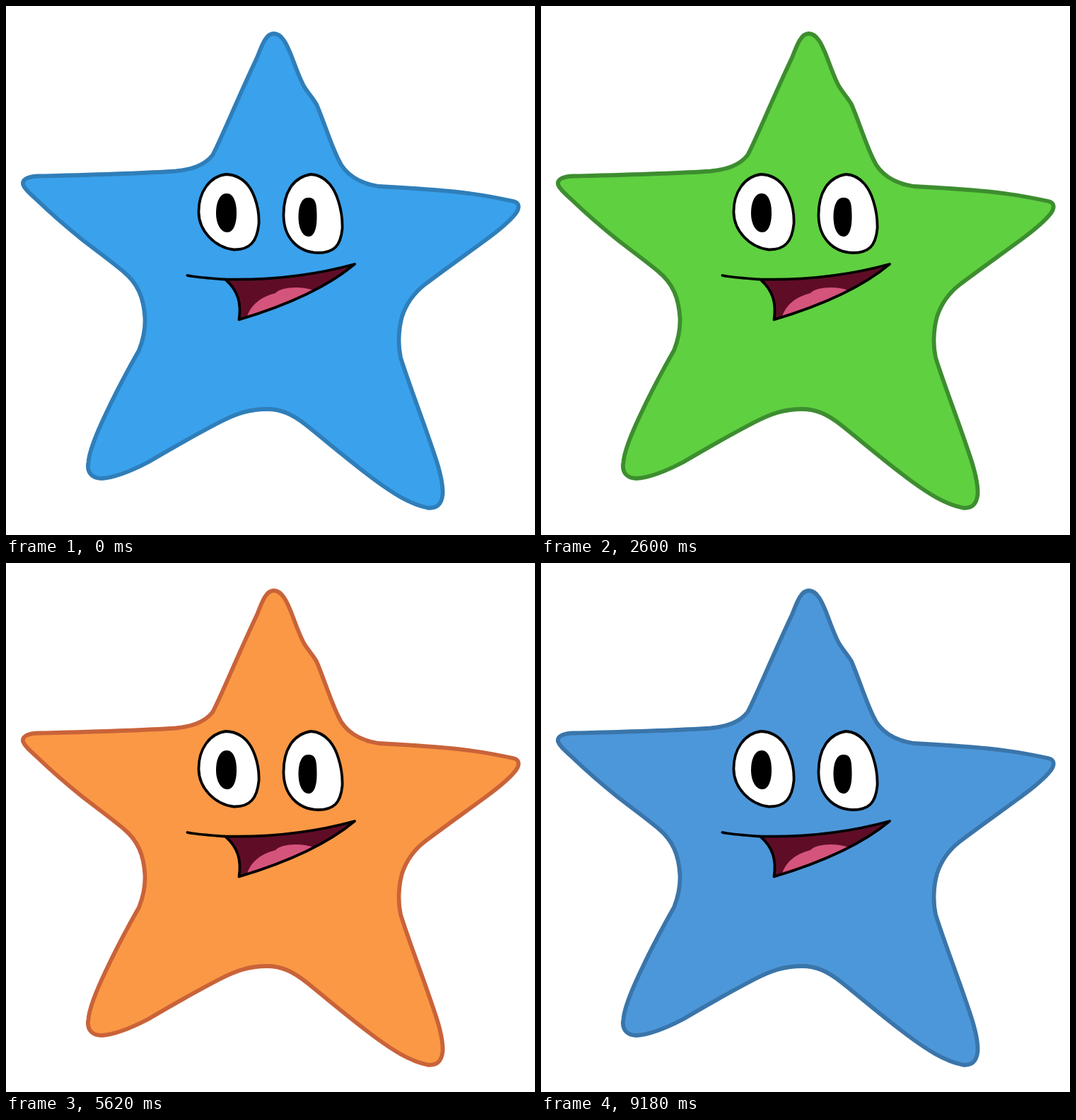
Recreate the animation shown at these times as an HTML page. Size 748x748 px, loop 9240 ms.

```html
<!DOCTYPE html>
<html lang="en">
<head>
<meta charset="utf-8">
<title>Color-changing star</title>
<style>
  html, body { margin: 0; width: 100%; height: 100%; overflow: hidden; background: #fff; }
  svg { display: block; width: 100%; height: 100%; }
  .ink { stroke: #000; stroke-width: 3.8; stroke-linecap: round; stroke-linejoin: round; }
</style>
</head>
<body>
<svg viewBox="0 0 748 748">
  <path id="star" stroke-width="5.8" stroke-linejoin="round" d="M378.500 39
    C391 39 398 57 403 69 C408 82 414 100 421 113 C427 123 434 130 439 139
    C449 162 459 195 470 217 C479 238 500 251 527 255
    C585 258 630 261 662 266 C684 269 703 273 717 276 C727 278 726 286 721 293
    C712 305 697 317 678 331 C648 353 620 373 592 394 C574 408 565 424 560 439
    C555 457 554 480 558 497 C570 536 590 586 607 638 C614 659 618 676 617.500 690
    C616 706 608 711 596 709.500 C570 704 546 688 524 672 C490 647 455 617 425 593
    C405 577 389 570 369 570 C343 570 324 577 302 588.500 C270 605 230 628 201 645
    C178 657 155 667 135 668 C120 668 114 658 116.500 645 C118 628 130 600 141 577
    C156 545 172 515 188 487 C194 472 197 458 196.500 442
    C195 412 186 392 166 375.500 C150 362 128 346 108 330.500 C80 308 58 288 44 274.500
    C35 266 26 259 24 252 C23 244 33 241 46 240.500 C110 239 180 237.500 240 233.500
    C262 231 280 226 292 211 C300 198 330 125 355 73 C361 58 367 39 378.500 39 Z"/>

  <g class="ink" fill="#fff">
    <path d="M311 238 C334 239 346 255 352 272 C357 286 358 297 357.500 308
      C355 333 345 345 322 344.500 C295 341 273 318 272.500 292 C272 263 288 241 311 238 Z"/>
    <path d="M431 238 C453 239 465 259 470 276 C475 292 476 302 475.500 315
      C473 340 463 349 441 349 C412 348 393 327 392.500 297 C392 264 406 242 431 238 Z"/>
  </g>
  <path d="M312 265 C322 265 326 278 326 293 C326 309 321 320 313 320
    C303 320 297 307 297 293 C297 278 302 265 312 265 Z"/>
  <path d="M427 271 C437 271 439.500 276 439.500 299 C439.500 316 435 326 428 326
    C419 326 413.500 314 413.500 298 C413.500 283 418 271 427 271 Z"/>

  <path fill="#5f0d27" d="M310 386.500 C375 388 435 381 493 365
    C450 401 388 426 329.500 443.500 C333 420 328 402 310 386.500 Z"/>
  <path fill="#d5547c" d="M341 439 C346 424 358 412 381 406 C388 398 415 395 435 402
    C405 417 372 430 341 439 Z"/>
  <path class="ink" fill="none" d="M256.500 381 C270 384 290 385 310 386.500 C375 388 435 381 493 365
    C450 401 388 426 329.500 443.500 C333 420 328 402 310 386.500"/>
</svg>
<script>
  const HOLD = 1000, STEP = 60, STEPS = 10;
  const SEGMENT = HOLD + STEP * (STEPS - 1);

  const palette = [
    { fill: [58, 161, 236], stroke: [47, 126, 185] },
    { fill: [59, 239, 65], stroke: [47, 166, 51] },
    { fill: [237, 84, 58], stroke: [118, 42, 29] },
    { fill: [250, 154, 58], stroke: [200, 100, 50] },
    { fill: [255, 136, 163], stroke: [214, 91, 118] },
    { fill: [237, 60, 57], stroke: [161, 39, 37] }
  ];

  const star = document.getElementById('star');
  const mix = (a, b, k) => `rgb(${a.map((v, i) => Math.round(v + (b[i] - v) * k))})`;

  // Each color holds, then blends to the next in equal discrete steps.
  function draw(now) {
    const time = now % (SEGMENT * palette.length);
    const index = Math.floor(time / SEGMENT);
    const local = time - index * SEGMENT;
    const blend = local < HOLD ? 0 : (Math.floor((local - HOLD) / STEP) + 1) / STEPS;
    const from = palette[index];
    const to = palette[(index + 1) % palette.length];
    for (const part of ['fill', 'stroke']) {
      star.setAttribute(part, mix(from[part], to[part], blend));
    }
  }

  const start = performance.now();
  function tick() {
    draw(performance.now() - start);
    requestAnimationFrame(tick);
  }
  tick();
</script>
</body>
</html>
```
